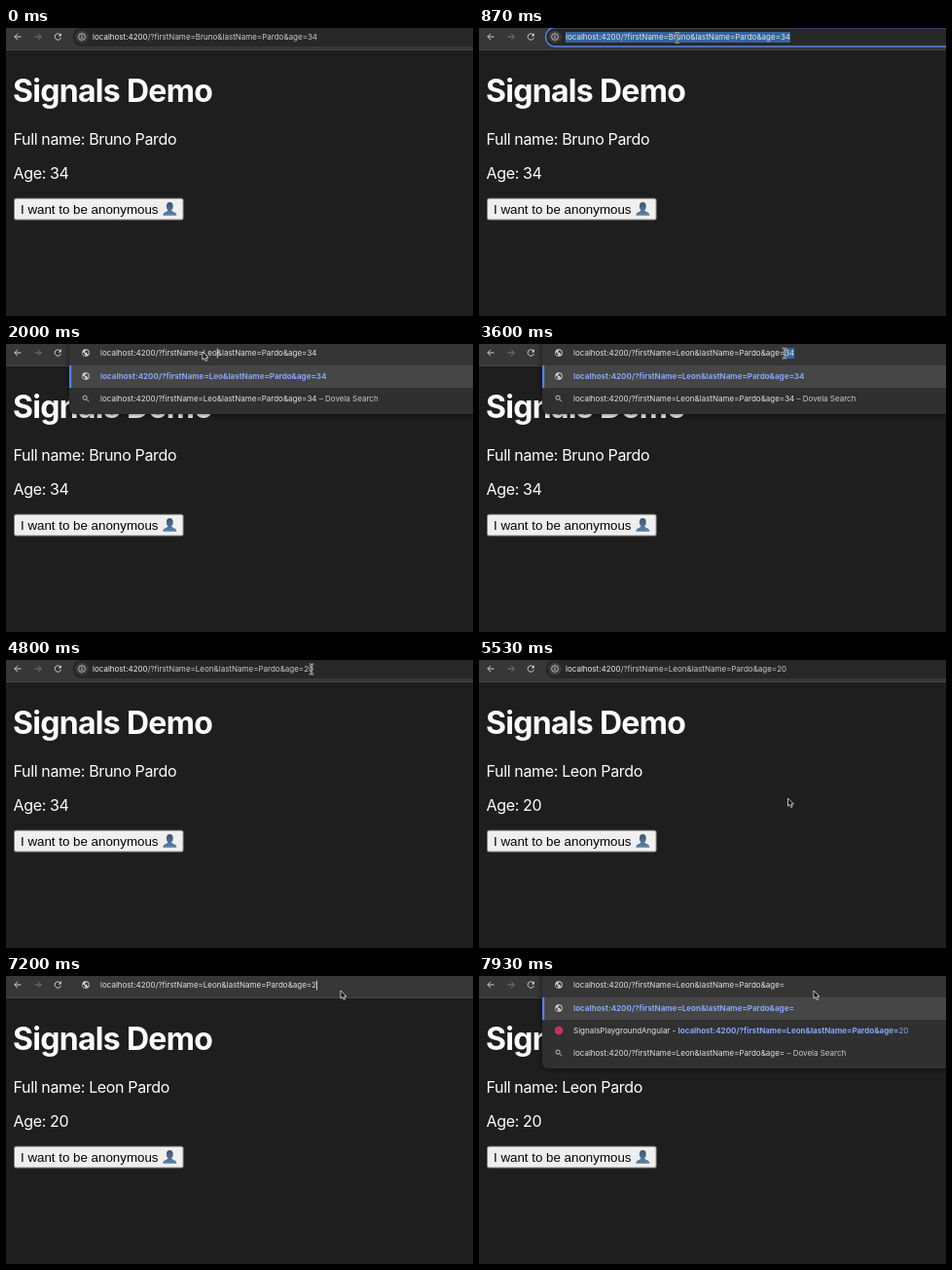
Animation, 480 px wide and 296 px high, one loop 8 s. Source, as an HTML page with a canvas:

```html
<!DOCTYPE html>
<html lang="en">
<head>
<meta charset="utf-8">
<title>Signals Demo</title>
<style>
  html, body { margin: 0; width: 100%; height: 100%; overflow: hidden; background: #1e1e1e; }
  canvas { display: block; }
</style>
</head>
<body>
<canvas id="stage" width="480" height="296"></canvas>
<script>
const ctx = document.getElementById('stage').getContext('2d');
const LOOP = 8000, TICK = 1000 / 15;
const SANS = 'Inter, "Noto Sans", sans-serif';
const SMALL = '8px ' + SANS, SMALL_BOLD = '700 8px ' + SANS;
const HOST = 'localhost:4200';
const C = {
  page: '#1e1e1e', bar: '#373737', line: '#444444', field: '#282828', popup: '#303031',
  row: '#464647', text: '#e3e3e3', dim: '#c8c8c8', link: '#86a5f6', ring: '#5384e8', select: '#35659f'
};

// mode: idle | focus | edit; select: all | first | age; rows: suggestions shown
const events = [
  [0, { mode: 'idle', first: 'Bruno', age: '34', name: 'Bruno', years: '34', select: '', caret: '', rows: 0 }],
  [860, { mode: 'focus', select: 'all' }],
  [1000, { select: 'first' }],
  [1660, { mode: 'edit', select: '', first: 'L', caret: 'first' }],
  [1790, { first: 'Le', rows: 2 }],
  [1990, { first: 'Leo' }],
  [2130, { first: 'Leon' }],
  [3460, { select: 'age', caret: '' }],
  [4190, { select: '', age: '2', caret: 'age' }],
  [4260, { age: '20' }],
  [4790, { mode: 'idle', caret: '', rows: 0 }],
  [4860, { name: 'Leon', years: '20' }],
  [6390, { mode: 'focus', select: 'all' }],
  [6660, { select: '', caret: 'age' }],
  [7190, { mode: 'edit', age: '2' }],
  [7260, { rows: 3 }],
  [7330, { age: '' }]
];

const pointer = [
  [0, 340, 87, ''], [60, 340, 87, 'arrow'], [130, 325, 61, 'arrow'], [330, 325, 61, 'arrow'],
  [800, 204, 10, 'beam'], [1200, 202, 8, 'arrow'], [2400, 202, 8, 'arrow'],
  [2900, 341, 26, 'arrow'], [3200, 317, 9, 'beam'], [3330, 317, 9, 'beam'], [3500, 314, 9.5, 'beam'],
  [4930, 314, 9.5, 'beam'], [5200, 314, 9.5, 'arrow'], [5530, 317.5, 142, 'arrow'], [5700, 317.5, 142, 'arrow'],
  [6270, 343.5, 15.5, 'beam'], [7190, 344, 15, 'arrow'], [8000, 344, 15, 'arrow']
];

function stateAt(t) {
  const s = { since: 0 };
  for (const [at, change] of events) if (t >= at) Object.assign(s, change, { since: at });
  return s;
}

function pointerAt(t) {
  let i = 0;
  while (i < pointer.length - 2 && t >= pointer[i + 1][0]) i++;
  const [t0, x0, y0, shape] = pointer[i], [t1, x1, y1] = pointer[i + 1];
  const k = Math.min(1, (t - t0) / (t1 - t0)), e = k * k * (3 - 2 * k);
  // A resting jump of a pixel or two is a shape change, not travel
  const moves = shape && Math.hypot(x1 - x0, y1 - y0) > 2.5;
  return { x: moves ? x0 + (x1 - x0) * e : x0, y: moves ? y0 + (y1 - y0) * e : y0, shape };
}

function text(str, x, y, font, color, spacing = 0) {
  ctx.font = font;
  ctx.letterSpacing = spacing + 'px';
  ctx.fillStyle = color;
  ctx.fillText(str, x, y);
  const end = x + ctx.measureText(str).width;
  ctx.letterSpacing = '0px';
  return end;
}

function rect(x, y, w, h, color) {
  ctx.fillStyle = color;
  ctx.fillRect(x, y, w, h);
}

function rounded(x, y, w, h, r) {
  ctx.beginPath();
  ctx.roundRect(x, y, w, h, r);
}

function disc(x, y, r, color) {
  ctx.fillStyle = color;
  ctx.beginPath();
  ctx.arc(x, y, r, 0, 7);
  ctx.fill();
}

function stroke(d, color, width = 1) {
  ctx.strokeStyle = color;
  ctx.lineWidth = width;
  ctx.stroke(new Path2D(d));
}

function fill(d, color) {
  ctx.fillStyle = color;
  ctx.fill(new Path2D(d));
}

function navIcons() {
  stroke('M15.5 9H8.8M12 5.8L8.8 9L12 12.2', '#d0d0d0');
  stroke('M29.5 9H36.2M33 5.8L36.2 9L33 12.2', '#777777');
  stroke('M56 7.2A3.2 3.2 0 1 0 56.4 10', '#d0d0d0');
  fill('M56.9 5.3V8.4H53.8Z', '#d0d0d0');
}

function infoIcon() {
  disc(78, 9, 6.5, '#3c3c3d');
  stroke('M74.6 9a3.4 3.4 0 1 0 6.8 0a3.4 3.4 0 1 0 -6.8 0', '#d5d5d5', 0.8);
  rect(77.5, 8.6, 1, 2.3, '#d5d5d5');
  rect(77.5, 6.9, 1, 1, '#d5d5d5');
}

function globe(x, y, back) {
  disc(x, y, 3.8, '#d2d2d2');
  ctx.save();
  ctx.translate(x, y);
  fill('M-3 -.8L-.7 1.3V2.9A3 3 0 0 1 -3 -.8Z', back);
  fill('M.7 -2.9Q.6 -1.5 -1 -1.3V-.3H1.3V1.3L2.4 1.7A3 3 0 0 0 .7 -2.9Z', back);
  ctx.restore();
}

function searchIcon(x, y) {
  ctx.save();
  ctx.translate(x, y);
  stroke('M-3 -.8a2.1 2.1 0 1 0 4.2 0a2.1 2.1 0 1 0 -4.2 0M.8 .9L3.2 3.3', '#cccccc', 0.9);
  ctx.restore();
}

function drawPage(s) {
  rect(0, 0, 480, 296, C.page);
  text('Signals Demo', 7, 76, '700 32px ' + SANS, '#ffffff', -0.7);
  text(`Full name: ${s.name} Pardo`, 7.5, 119.8, '16px ' + SANS, '#ffffff', -0.35);
  text(`Age: ${s.years}`, 7.5, 154.8, '16px ' + SANS, '#ffffff', -0.35);

  rounded(8, 174.8, 174.6, 22.8, 2.5);
  ctx.fillStyle = '#868686';
  ctx.fill();
  rounded(9, 175.8, 172.6, 20.8, 1.5);
  ctx.fillStyle = '#efefef';
  ctx.fill();
  text('I want to be anonymous', 15, 190.8, '13.333px "Liberation Sans", Arial, sans-serif', '#000000');

  const bust = ctx.createLinearGradient(0, 179, 0, 193);
  bust.addColorStop(0, '#3d5570');
  bust.addColorStop(1, '#5c82a8');
  ctx.fillStyle = bust;
  ctx.beginPath();
  ctx.ellipse(168.3, 183.3, 3.4, 4.3, 0, 0, 7);
  ctx.fill();
  fill('M161.3 192.8Q161.3 189.6 164.5 188.9Q166.8 188.3 166.8 186H169.8Q169.8 188.3 172.1 188.9Q175.3 189.6 175.3 192.8Z', bust);
}

function drawRows(s, url) {
  const rowY = i => 33 + 23 * i;
  rect(65, 22, 415, 23, C.row);
  rect(65, 22, 2.2, 23, C.ring);
  globe(82, rowY(0), C.row);
  text(url, 97, rowY(0) + 3, SMALL_BOLD, C.link);

  if (s.rows === 3) {
    const y = rowY(1);
    disc(82, y, 4.3, '#c4306e');
    let x = text('SignalsPlaygroundAngular - ', 97, y + 3, SMALL, C.text);
    x = text(url, x, y + 3, SMALL_BOLD, C.link);
    text('20'.slice(s.age.length), x, y + 3, SMALL, C.link);
  }

  const y = rowY(s.rows - 1);
  searchIcon(82, y);
  const x = text(url, 97, y + 3, SMALL, C.text);
  text(' – Dovela Search', x, y + 3, SMALL, C.dim);
}

function drawBar(s, t) {
  rect(0, 0, 480, 22, C.bar);
  rect(0, 22, 480, 1, C.line);
  navIcons();

  const editing = s.mode === 'edit';
  if (editing) {
    ctx.save();
    if (s.rows) {
      ctx.shadowColor = 'rgba(0,0,0,.55)';
      ctx.shadowBlur = 6;
      ctx.shadowOffsetY = 1;
    }
    rounded(65, -10, 430, s.rows ? 36 + 23 * s.rows : 30, s.rows ? 6 : 10);
    ctx.fillStyle = s.rows ? C.popup : C.bar;
    ctx.fill();
    ctx.restore();
    if (s.rows) rect(65, 0, 415, 22, '#353536');
    globe(82, 9, C.bar);
  } else {
    rounded(68.5, -0.5, 430, 19.5, 9.7);
    ctx.fillStyle = C.field;
    ctx.fill();
    if (s.mode === 'focus') {
      ctx.strokeStyle = C.ring;
      ctx.lineWidth = 1.5;
      ctx.stroke();
    }
    infoIcon();
  }

  const left = editing ? 97 : 89;
  const before = HOST + '/?firstName=';
  const toAge = before + s.first + '&lastName=Pardo&age=';
  const url = toAge + s.age;
  ctx.font = SMALL;
  const xAt = str => left + ctx.measureText(str).width;
  const spans = { all: ['', url], first: [before, before + s.first], age: [toAge, url] };
  if (s.select) {
    const [from, to] = spans[s.select].map(xAt);
    rect(from, 4, to - from, 11, C.select);
  }
  if (s.mode === 'idle') {
    const x = text(HOST, left, 12, SMALL, '#ececec');
    text(url.slice(HOST.length), x, 12, SMALL, C.dim);
  } else {
    text(url, left, 12, SMALL, C.text);
  }
  if (s.caret && (t - s.since) % 1000 < 500) {
    rect(xAt(spans[s.caret][1]), 4.5, 0.8, 10, '#f0f0f0');
  }
  if (s.rows) drawRows(s, url);
}

function drawPointer({ x, y, shape }) {
  if (!shape) return;
  ctx.save();
  ctx.translate(x, y);
  if (shape === 'arrow') {
    const d = 'M0 0V8.2L1.9 6.5L3.2 9.5L4.7 8.8L3.4 6H6Z';
    fill(d, '#101010');
    stroke(d, '#e8e8e8', 0.8);
  } else {
    const d = 'M-2.2 -5Q0 -5 0 -3.8Q0 -5 2.2 -5M0 -3.8V3.8M-2.2 5Q0 5 0 3.8Q0 5 2.2 5';
    stroke(d, '#f0f0f0', 1.8);
    stroke(d, '#181818', 0.8);
  }
  ctx.restore();
}

function draw(now) {
  const t = Math.floor((now % LOOP + 4) / TICK) * TICK;
  const s = stateAt(t);
  drawPage(s);
  drawBar(s, t);
  drawPointer(pointerAt(t));
  requestAnimationFrame(draw);
}

const start = performance.now();
draw(0);
function frame() {}
</script>
</body>
</html>
```
